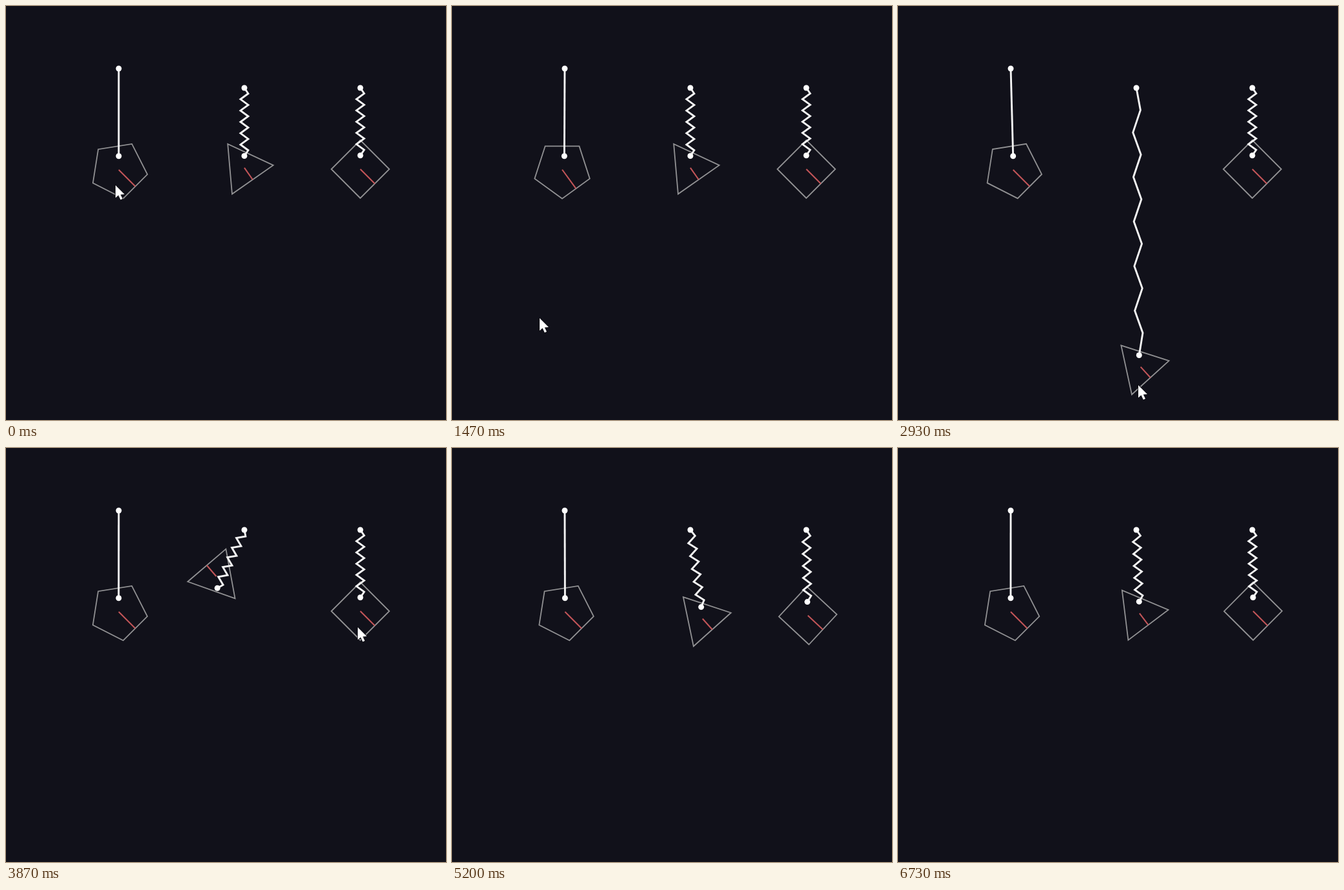
Recreate the animation shown at these times as an HTML page with a canvas. Size 683x642 px, loop 6.79 s.

```html
<!DOCTYPE html>
<html lang="en">
<head>
<meta charset="utf-8">
<title>Constraints</title>
<style>
  html, body { margin: 0; width: 100%; height: 100%; overflow: hidden; background: #11111a; }
  canvas { display: block; }
</style>
</head>
<body>
<canvas id="stage" width="683" height="642"></canvas>
<script>
const ctx = document.getElementById('stage').getContext('2d');
const LOOP = 6790, FPS = 15, LAST = 101;
const RAD = Math.PI / 180, RADIUS = 45;

// Moments, in seconds, when a body is grabbed, fully pulled and let go.
const PENT_FREE = 1.467;
const TRI_GRAB = 2.2, TRI_PULLED = 2.9, TRI_FREE = 2.95;
const DIA_GRAB = 3.87, DIA_PULLED = 4.533, DIA_FREE = 4.6;
const CURSOR_GONE = 4.9;

const mix = (a, b, u) => a + (b - a) * u;

// Smooth step from 0 to 1 between two moments.
function ease(from, to, t) {
  const u = Math.min(1, Math.max(0, (t - from) / (to - from)));
  return u * u * (3 - 2 * u);
}

// Damped oscillation.
const swing = (t, size, decay, speed, phase = 0) =>
  size * Math.exp(-decay * t) * Math.cos(speed * t + phase);

const moves = [
  { from: 0, to: 1.2, x: 136, y: 484 },
  { from: PENT_FREE, to: 2.15, x: 366, y: 279 },
  { from: TRI_GRAB, to: TRI_PULLED, x: 373, y: 588 },
  { from: TRI_FREE, to: 3.8, x: 546, y: 278 },
  { from: DIA_GRAB, to: DIA_PULLED, x: 537, y: 607 },
  { from: DIA_PULLED, to: CURSOR_GONE, x: 533, y: 680 }
];

function cursorAt(t) {
  let x = 170, y = 278;
  for (const move of moves) {
    const u = ease(move.from, move.to, t);
    x = mix(x, move.x, u);
    y = mix(y, move.y, u);
  }
  return [x, y];
}

// Offset from a body's centre to its pin.
function pinOffset({ arm: [x, y], turn }) {
  const c = Math.cos(turn * RAD), s = Math.sin(turn * RAD);
  return [x * c - y * s, x * s + y * c];
}

function withCenter(body, x, y) {
  const [dx, dy] = pinOffset(body);
  return { ...body, x, y, pin: [x + dx, y + dy] };
}

function withPin(body, x, y) {
  const [dx, dy] = pinOffset(body);
  return { ...body, x: x - dx, y: y - dy, pin: [x, y] };
}

// Swings on a rigid rod: driven by the cursor, then dying away.
function pentagon(t) {
  const rod = 135.8, speed = 6.33;
  const driven = -28 * Math.sin(speed * t);
  const free = swing(t - 2.933, 5.5, 1.15, 5.9, -0.84);
  const tilt = t < PENT_FREE
    ? -9.1 * Math.min(1, t) * Math.cos(speed * t)
    : swing(t - PENT_FREE, 9.1, 4, speed);
  const body = { sides: 5, arm: [-15, -15], anchor: [175, 97], turn: 45 + tilt };
  const dx = mix(driven, free, ease(PENT_FREE, 1.95, t)) + pinOffset(body)[0];
  return withPin(body, 175 + dx, 97 + Math.sqrt(rod * rod - dx * dx));
}

// Pulled down, flung up past its anchor, then bouncing and swinging.
function triangle(t) {
  const body = { sides: 3, arm: [-15, -10.5], anchor: [370, 127], spring: true };
  const rest = [370, 232.5];
  let dx, dy;
  if (t < TRI_FREE) {
    const pull = ease(TRI_GRAB, TRI_PULLED, t);
    [dx, dy] = [4.3 * pull, 309 * pull];
    body.turn = 55 - 7.3 * pull;
  } else {
    const s = t - TRI_FREE, calm = ease(3.9, 4.45, t);
    const swayX = swing(t - 5.2, 38.5, 0.8, 5.6, -1.12);
    const swayY = swing(t - 5.2, 31, 1.1, 9, -1.1);
    dx = mix(4.3 - 55 * s * s, swayX, calm);
    dy = mix(swing(s, 309, 1.2, 8.73), swayY, calm);
    const flip = 47.7 + 181.8 * ease(TRI_FREE, 3.85, t);
    const hang = 55 - 0.48 * swayX + Math.min(175, 34 * Math.exp(5 * (DIA_PULLED - t)));
    body.turn = mix(flip, hang, calm);
  }
  return withPin(body, rest[0] + dx, rest[1] + dy);
}

// Pulled down like the triangle, but its spring is damped.
function diamond(t) {
  const body = { sides: 4, arm: [-15, -15], anchor: [550, 127], spring: true };
  const pull = ease(DIA_GRAB, DIA_PULLED, t), s = t - DIA_FREE;
  let dx = -10.3 * pull, dy = 325 * pull;
  body.turn = 45 - 4 * pull;
  if (s > 0) {
    dx = swing(t - 5.41, 6, 0.6, 5.6) - 8.6 * Math.exp(-6 * s);
    dy = swing(s, 325, 5.9, 9.2);
    body.turn = 45 - swing(s, 4, 0.9, 11.2);
  }
  return withCenter(body, 550 + dx, 253 + dy);
}

function stroke(points, color, width, close) {
  ctx.beginPath();
  points.forEach(([x, y]) => ctx.lineTo(x, y));
  if (close) ctx.closePath();
  ctx.strokeStyle = color;
  ctx.lineWidth = width;
  ctx.stroke();
}

function drawBody({ x, y, sides, turn }) {
  const step = 2 * Math.PI / sides, a = turn * RAD;
  const polar = (r, angle) => [x + r * Math.cos(angle), y + r * Math.sin(angle)];
  const corners = Array.from({ length: sides }, (_, i) => polar(RADIUS, a + step * (i + 0.5)));
  stroke(corners, '#929294', 1.8, true);
  stroke([[x, y], polar(RADIUS * Math.cos(step / 2), a)], '#c25558', 2.1);
}

function drawLink({ anchor, pin, spring }) {
  const [ax, ay] = anchor;
  const dx = pin[0] - ax, dy = pin[1] - ay, len = Math.hypot(dx, dy) || 1;
  const coils = spring ? 12 : 1, points = [anchor];
  for (let j = 1; j < coils; j++) {
    const side = j % 2 ? -6 : 6, u = j / coils;
    points.push([ax + dx * u - dy / len * side, ay + dy * u + dx / len * side]);
  }
  points.push(pin);
  stroke(points, '#f4f4f4', 2.9);
  ctx.fillStyle = '#fff';
  for (const [x, y] of [anchor, pin]) {
    ctx.beginPath();
    ctx.arc(x, y, 4.5, 0, 2 * Math.PI);
    ctx.fill();
  }
}

const ARROW = [[0, 0], [0, 19.5], [4.5, 15.6], [7.8, 22.4], [11, 21], [7.8, 14.4], [14, 14]];

function drawCursor([x, y]) {
  stroke(ARROW.map(([dx, dy]) => [x + dx, y + dy]), '#0c0c12', 1.6, true);
  ctx.fillStyle = '#fff';
  ctx.fill();
}

function draw(t) {
  ctx.fillStyle = '#11111a';
  ctx.fillRect(0, 0, 683, 642);
  const bodies = [pentagon(t), triangle(t), diamond(t)];
  bodies.forEach(drawBody);
  bodies.forEach(drawLink);
  if (t < CURSOR_GONE) drawCursor(cursorAt(t));
}

const start = performance.now();
function tick() {
  const ms = (performance.now() - start) % LOOP;
  const step = Math.min(LAST, Math.floor((ms + 3.4) * FPS / 1000));
  draw(step / FPS);
  requestAnimationFrame(tick);
}
tick();
</script>
</body>
</html>
```
